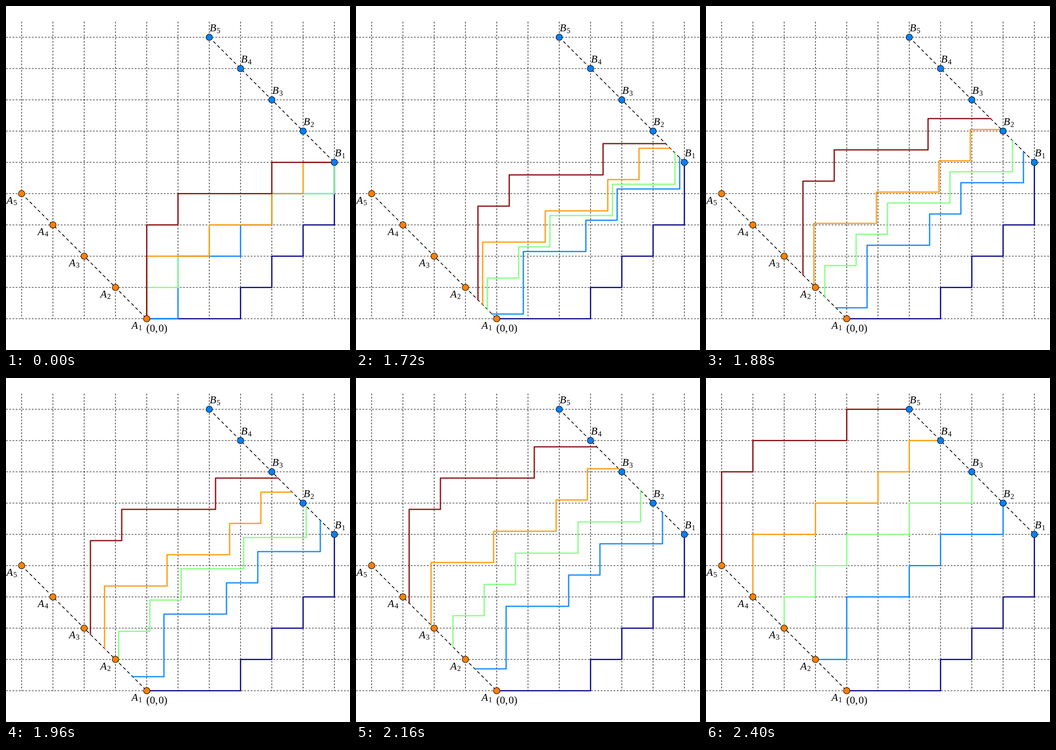
Animation, 748 px wide and 748 px high, one loop 4.82 s. Source, as an HTML page:

```html
<!DOCTYPE html>
<html lang="en">
<head>
<meta charset="utf-8">
<title>Lattice paths</title>
<style>
  html, body { margin: 0; width: 100%; height: 100%; overflow: hidden; background: #fff; }
  svg { display: block; width: 100%; height: 100%; }
  .grid { stroke: #000; stroke-width: 1.1; stroke-dasharray: 4 3; }
  .diagonal { stroke: #000; stroke-width: 1.6; stroke-dasharray: 7 5.5; }
  .path {
    fill: none; stroke-width: 2.6; stroke-linecap: round; stroke-linejoin: round;
    animation: spread 4820ms infinite;
  }
  .dot { stroke: #000; stroke-width: 1.1; }
  text { font: 23px "Liberation Serif", serif; }
  .letter { font-style: italic; }
  .index { font-size: 16px; }
  /* 40 jumps of 20 ms, the first at 1620 ms */
  @keyframes spread {
    0% { transform: translate(0, 0); }
    33.609% { transform: translate(0, 0); animation-timing-function: steps(40, start); }
    50.207%, 100% { transform: translate(var(--shift), var(--shift)); }
  }
</style>
</head>
<body>
<svg id="stage" viewBox="0 0 748 748"></svg>
<script>
const CELL = 68, ORIGIN = { x: 306, y: 680 }, END = { x: 714, y: 340 };
const stage = document.getElementById('stage');

function add(tag, attrs, content = '') {
  const node = document.createElementNS('http://www.w3.org/2000/svg', tag);
  for (const [key, value] of Object.entries(attrs)) node.setAttribute(key, value);
  node.textContent = content;
  stage.append(node);
  return node;
}

function line(cls, x1, y1, x2, y2) {
  add('line', { class: cls, x1, y1, x2, y2 });
}

function label(letter, index, x, y) {
  add('text', { class: 'letter', x, y }, letter);
  add('text', { class: 'index', x: x + 15, y: y + 3.5 }, index);
}

for (let x = 34; x <= 714; x += CELL) line('grid', x, 34, x, 680);
for (let y = 68; y <= 680; y += CELL) line('grid', 0, y, 748, y);
for (const p of [ORIGIN, END]) line('diagonal', p.x - 4 * CELL, p.y - 4 * CELL, p.x, p.y);

// Unit steps: R = right, U = up
const paths = [
  ['#000080', 'RRRURURUURU'],
  ['#0080ff', 'RUURRURURRU'],
  ['#7dff7a', 'URURURRURRU'],
  ['#ff9400', 'UURRURRURUR'],
  ['#800000', 'UUURURRRURR']
];
paths[0][1] = 'RRRURURURUU';

paths.forEach(([stroke, steps], i) => {
  const moves = [...steps].map(s => s === 'R' ? `h${CELL}` : `v${-CELL}`).join('');
  const path = add('path', { class: 'path', stroke, d: `M${ORIGIN.x} ${ORIGIN.y}${moves}` });
  path.style.setProperty('--shift', `${-i * CELL}px`);
});

for (let i = 0; i < 5; i++) {
  const shift = i * CELL;
  const a = { x: ORIGIN.x - shift, y: ORIGIN.y - shift };
  const b = { x: END.x - shift, y: END.y - shift };
  add('circle', { class: 'dot', cx: a.x, cy: a.y, r: 7, fill: '#ff8000' });
  add('circle', { class: 'dot', cx: b.x, cy: b.y, r: 7, fill: '#0080ff' });
  label('A', i + 1, a.x - 33, a.y + 21.5);
  label('B', i + 1, b.x + 1, b.y - 13);
}
add('text', { x: 305, y: 708 }, '(0,\u200a0)');
</script>
</body>
</html>
```
